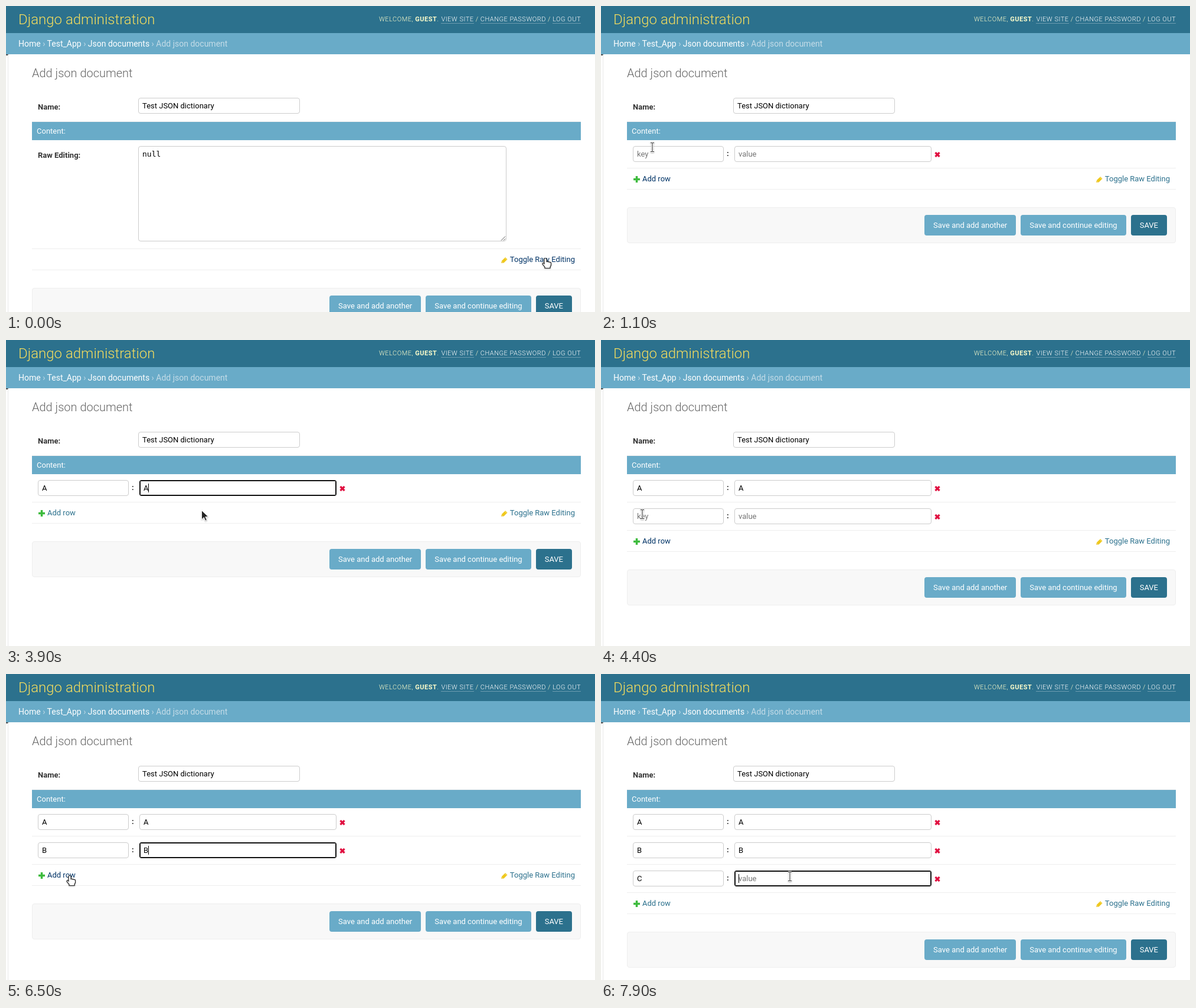
Recreate the animation shown at these times as an HTML page. Size 998 px wide and 520 px high, loop 8000 ms.

```html
<!DOCTYPE html>
<html lang="en">
<head>
<meta charset="utf-8">
<title>Add json document</title>
<style>
  * { box-sizing: border-box; }
  html, body { margin: 0; width: 100%; height: 100%; overflow: hidden; }
  body { position: relative; background: #fff; color: #333; font: 13px/15px Roboto, sans-serif; cursor: none; }
  .at { position: absolute; white-space: nowrap; }
  header { left: 0; top: 0; width: 998px; height: 46px; background: #2c718d; }
  h1 { left: 21px; top: 0; margin: 0; font: 300 24px/46px Roboto, sans-serif; color: #f5dd5d; }
  .user { left: 632px; width: 342px; top: 0; display: flex; justify-content: space-between;
    font: 300 11px/46px Roboto, sans-serif; letter-spacing: .5px; color: #ffc; }
  .user a { color: #fff; border-bottom: 1px solid rgba(255,255,255,.3); }
  .crumbs { left: 0; top: 46px; width: 998px; height: 36px; padding-left: 21px; background: #69abc8;
    font-size: 14px; line-height: 36px; color: #c4dce8; }
  .crumbs a { color: #fff; }
  h2 { left: 44px; top: 102px; margin: 0; font: 300 20px/24px Roboto, sans-serif; color: #666; }
  .edge { left: 0; top: 82px; width: 4px; height: 438px; border-right: 1px solid #e8e8e8; border-top: 2px solid #555; }
  .field { height: 27px; padding: 5px 6px; border: 1px solid #ccc; border-radius: 4px; background: #fff; color: #000; }
  .focus { border-color: #101010; border-radius: 3px; box-shadow: inset 0 0 0 1px #101010; }
  .key { left: 10px; top: 10px; width: 154px; }
  .value { left: 182px; top: 10px; width: 334px; }
  .hint { color: #757575; }
  .caret { position: absolute; width: 1px; height: 15px; background: #000; }
  .caption { left: 44px; top: 196px; width: 930px; height: 32px; padding-left: 8px; border-top: 1px solid #eee;
    line-height: 31px; background: #69abc8; color: #fff; }
  main { position: absolute; left: 44px; top: 228px; width: 930px; }
  .row { position: relative; height: 48px; border-bottom: 1px solid #eee; }
  .raw { height: 185px; }
  .raw .field { left: 180px; top: 10px; width: 624px; height: 162px; font-family: "DejaVu Sans Mono", monospace; }
  .tools { position: relative; height: 36px; border-bottom: 1px solid #eee; line-height: 35px; color: #2c718d; }
  .hover { color: #036; }
  .submit { margin-top: 30px; height: 61px; padding: 12px 14px; display: flex; justify-content: flex-end; gap: 8px;
    background: #f8f8f8; border: 1px solid #eee; border-radius: 4px; }
  .submit span { padding: 0 15px; border-radius: 4px; line-height: 35px; white-space: nowrap; background: #69abc8; color: #fff; }
  .submit .save { background: #2c718d; }
  svg { position: absolute; left: 0; top: 0; width: 1px; height: 1px; overflow: visible; pointer-events: none; }
  #pointer { filter: drop-shadow(0 1px 1px rgba(0,0,0,.3)); }
</style>
</head>
<body>
<header class="at"></header>
<h1 class="at">Django administration</h1>
<div class="at user">
  <span>WELCOME, <b>GUEST</b>.</span>
  <span><a>VIEW SITE</a> / <a>CHANGE PASSWORD</a> / <a>LOG OUT</a></span>
</div>
<div class="at crumbs"><a>Home</a> › <a>Test_App</a> › <a>Json documents</a> › Add json document</div>
<div class="at edge"></div>
<h2 class="at">Add json document</h2>
<b class="at" style="left:54px;top:164px">Name:</b>
<div class="at field" style="left:224px;top:156px;width:274px">Test JSON dictionary</div>
<div class="at caption">Content:</div>
<main>
  <div class="row raw" id="raw">
    <b class="at" style="left:10px;top:18px">Raw Editing:</b>
    <div class="at field">null<svg><path d="M614 159.5l7-7m-3 7l3-3" stroke="#555"/></svg></div>
  </div>
  <div id="rows"></div>
  <div class="tools">
    <span id="add">
      <svg><path d="M16.500 13v11m-5.500-5.500h11" stroke="#3dbb3d" stroke-width="3.500"/></svg>
      <span class="at" style="left:26px">Add row</span>
    </span>
    <svg>
      <path d="M795 24l1-4 6-6 3.500 3.500-6 6z" fill="#efc81c"/>
      <path d="M795 24l1-3 2 2zM801 15l3.500 3.500" fill="#d9a514" stroke="#fff3b0" stroke-width=".6"/>
    </svg>
    <span class="at" id="toggle" style="right:10px">Toggle Raw Editing</span>
  </div>
  <div class="submit"><span>Save and add another</span><span>Save and continue editing</span><span class="save">SAVE</span></div>
</main>
<svg id="pointer">
  <path id="arrow" d="M.5 .5V16l3.800-3.500 2.500 5.800 2.600-1.100-2.500-5.700h5z" fill="#222" stroke="#fff"/>
  <path id="hand" d="M-2 2q2-3 4 0v4.500q1.500-1 2.500.5 1.500-1 2.500.5 2.500-.5 2.500 1.500v3.500l-1.500 3v2H-1v-2l-4-5q0-2.500 2-1.500l1 1z" fill="#fff" stroke="#222" stroke-width="1.200"/>
  <g id="beam" fill="none">
    <path id="stem" d="M-3-7.500h2.500l.5.500.5-.5H3M0-7V7m-3 .5h2.500L0 7l.5.500H3" stroke="#fff" stroke-width="3"/>
    <use href="#stem" style="stroke:#222"/>
    <path d="M-3-7.500h2.500l.5.500.5-.5H3M0-7V7m-3 .5h2.500L0 7l.5.500H3" stroke="#222"/>
  </g>
</svg>
<script>
const LOOP = 8000, STEP = 100, BLINK = 600, GLIDE = 500, RAW_END = 200;
const $ = id => document.getElementById(id);

// When each row appears, and when its key and value get focus and text.
const rows = [
  { text: 'A', added: 1000, focus: [1800, 3300], typed: [2700, 3500] },
  { text: 'B', added: 4400, focus: [4900, 5600], typed: [5100, 6000] },
  { text: 'C', added: 6600, focus: [7200, 7800], typed: [7400, Infinity] }
];
const blurs = rows.flatMap(row => [row.added, ...row.focus]);

// Where the pointer arrives: time, x, y. It rests there until the next glide.
const stops = [
  [0, 914, 428], [200, 914, 428], [500, 162, 255], [800, 90, 243], [1100, 87, 240], [1400, 119, 253],
  [3300, 330, 254], [3900, 331, 289], [4300, 70, 296], [4900, 110, 295], [5400, 293, 313],
  [5600, 320, 299], [6500, 108, 342], [7000, 107, 345], [7900, 320, 344]
];

$('rows').innerHTML = rows.map(() => `<div class="row">
  <div class="at field key"></div><b class="at" style="left:169px;top:15px">:</b><div class="at field value"></div>
  <svg><path d="M522.500 21l7 7m0-7l-7 7" stroke="#e01040" stroke-width="3.200"/></svg>
</div>`).join('');
const rowNodes = [...$('rows').children];

function pointerAt(t) {
  const i = stops.findIndex(stop => stop[0] > t);
  if (i < 0) return stops[stops.length - 1].slice(1);
  const [t0, x0, y0] = stops[i - 1], [t1, x1, y1] = stops[i];
  const start = Math.max(t0, t1 - GLIDE);
  const k = Math.max(0, (t - start) / (t1 - start)), ease = k * k * (3 - 2 * k);
  return [x0 + (x1 - x0) * ease, y0 + (y1 - y0) * ease].map(Math.round);
}

function drawField(t, row, field, name, focusAt, typedAt) {
  const blurAt = Math.min(...blurs.filter(time => time > focusAt));
  const focused = t >= focusAt && t < blurAt, filled = t >= typedAt;
  const lit = focused && (t - (filled ? typedAt : focusAt)) % (2 * BLINK) < BLINK;
  const caret = lit ? '<i class="caret"></i>' : '';
  field.classList.toggle('focus', focused);
  field.innerHTML = filled ? row.text + caret : `${caret}<span class="hint">${name}</span>`;
}

function drawPointer(t) {
  const [x, y] = pointerAt(t), under = document.elementFromPoint(x, y);
  const over = selector => under && under.closest(selector);
  const kind = over('#add, #toggle') ? 'hand' : over('.field') ? 'beam' : 'arrow';
  $('pointer').style.transform = `translate(${x}px,${y}px)`;
  for (const id of ['arrow', 'hand', 'beam']) $(id).style.display = id === kind ? '' : 'none';
}

function draw(now) {
  const t = Math.floor(now % LOOP / STEP) * STEP, raw = t < RAW_END;
  $('raw').style.display = raw ? '' : 'none';
  $('add').style.display = raw ? 'none' : '';
  $('toggle').classList.toggle('hover', t < RAW_END + STEP);
  // The link stays highlighted from just before the click until a field is focused.
  $('add').classList.toggle('hover', rows.some(row => t >= row.added - 200 && t < row.focus[0]));
  rows.forEach((row, i) => {
    rowNodes[i].style.display = t >= row.added ? '' : 'none';
    ['key', 'value'].forEach((name, j) =>
      drawField(t, row, rowNodes[i].querySelector('.' + name), name, row.focus[j], row.typed[j]));
  });
  drawPointer(t);
  requestAnimationFrame(draw);
}
requestAnimationFrame(draw);
</script>
</body>
</html>
```
